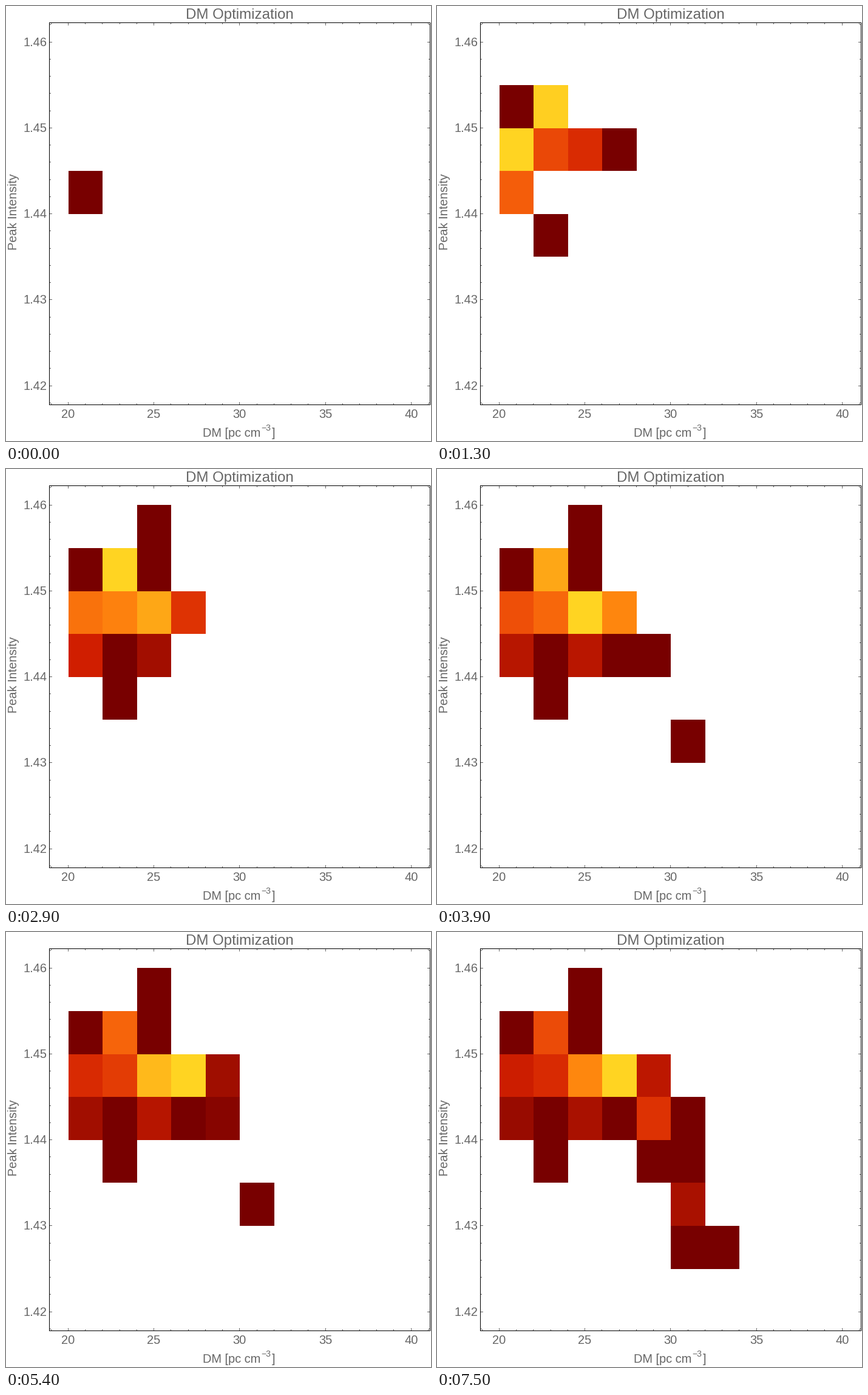
Animation, 700 px wide and 715 px high, one loop 8000 ms. Source, as a matplotlib script:

```python
import matplotlib.pyplot as plt
import numpy as np
from matplotlib.animation import FuncAnimation
from matplotlib.colors import LinearSegmentedColormap
from matplotlib.patches import Rectangle

W, H, DPI = 700, 715, 100
STEP_MS, STEPS = 100, 80
LEFT, RIGHT, TOP, BOTTOM = 71, 698, 27, 655
GRAY = "#666666"

SOLAR = LinearSegmentedColormap.from_list(
    "solar", ["#780000", "#d21f00", "#f3580a", "#fe870e", "#ffd422"], N=1024)

# The walk reaches each (column, row) bin at this step.
FOUND = {
    (0, 3): 0, (0, 2): 1, (1, 1): 2, (1, 2): 2, (1, 4): 3, (2, 2): 4,
    (3, 2): 6, (0, 1): 10, (2, 3): 14, (1, 3): 17, (2, 1): 20, (2, 0): 25,
    (3, 3): 34, (4, 3): 37, (5, 5): 38, (4, 2): 41, (4, 4): 56, (5, 3): 63,
    (5, 6): 63, (5, 4): 64, (6, 6): 75,
}

# Bins where it lingers: (first step, last step, final weight).
LINGER = {
    (0, 3): (0, 10, 1.0), (0, 2): (-12, 26, 2.6), (1, 1): (-8, 42, 4.9),
    (1, 2): (2, 36, 3.3), (2, 2): (4, 60, 8.3), (2, 3): (14, 54, 1.5),
    (3, 2): (18, 68, 11.1), (4, 2): (45, 62, 2.1), (4, 3): (48, 74, 3.7),
    (5, 5): (62, 74, 1.5),
}


def box(x, y, w, h, color, z=1):
    return ax.add_patch(Rectangle((x, y), w, h, facecolor=color, linewidth=0,
                                  antialiased=False, zorder=z))


def label(x, y, text, px, ha="center", va="baseline", **kw):
    return ax.text(x, y, text, fontsize=px * 72 / DPI, color=GRAY, ha=ha,
                   va=va, family="Liberation Sans", **kw)


def draw_frame():
    for dm in range(19, 42):
        x = int(102.4 + 28.24 * (dm - 20))
        size = 3 if dm % 5 else 5
        for y in (TOP, BOTTOM + 1 - size):
            box(x, y, 1, size, GRAY, 3)
        if dm % 5 == 0:
            label(x + 0.5, 677, str(dm), 20)

    for k in range(-1, 22):
        y = int(624.1 - 28.25 * k)
        size = 3 if k % 5 else 5
        for x in (LEFT, RIGHT + 1 - size):
            box(x, y, size, 1, GRAY, 3)
        if k % 5 == 0:
            label(67.5, y + 7, f"{1.42 + 0.002 * k:.2f}", 20, "right")

    for y in (TOP, BOTTOM):
        box(LEFT, y, RIGHT - LEFT + 1, 1, "black", 4)
    for x in (LEFT, RIGHT):
        box(x, TOP, 1, BOTTOM - TOP + 1, "black", 4)

    label(384.5, 21, "DM Optimization", 24)
    label(22, 338.5, "Peak Intensity", 20, "right", "center", rotation=90)
    label(324, 708, "DM [pc cm", 20, "left")
    label(420.5, 698, "\u22123", 14, "left")
    label(438, 708, "]", 20, "left")


def bin_patch(col, row):
    x0, x1 = (round(102.9 + 56.45 * c) for c in (col, col + 1))
    y0, y1 = (round(59.4 + 70.6 * r) for r in (row, row + 1))
    return box(x0, y0, x1 - x0, y1 - y0, "white", 2)


def weight(key, step):
    """Smoothly accumulated weight of a bin beyond its first hit."""
    if key not in LINGER or step < FOUND[key]:
        return 0.0
    first, last, total = LINGER[key]
    u = np.clip((step - first) / (last - first), 0, 1)
    return total * u * u * (3 - 2 * u)


def update(step):
    # Later on the walk moves less often: weights change on odd steps only.
    now = step if step < 30 else step - 1 + step % 2
    weights = {key: weight(key, now) for key in FOUND}
    peak = max(weights.values()) or 1
    for key, patch in patches.items():
        patch.set_visible(step >= FOUND[key])
        patch.set_facecolor(SOLAR(weights[key] / peak))
    return list(patches.values())


fig = plt.figure(figsize=(W / DPI, H / DPI), dpi=DPI, facecolor="white")
ax = fig.add_axes([0, 0, 1, 1])
ax.set(xlim=(0, W), ylim=(H, 0))
ax.axis("off")

draw_frame()
patches = {key: bin_patch(*key) for key in FOUND}

anim = FuncAnimation(fig, update, frames=STEPS, interval=STEP_MS,
                     repeat=True, repeat_delay=0, blit=False)
plt.show()
```
